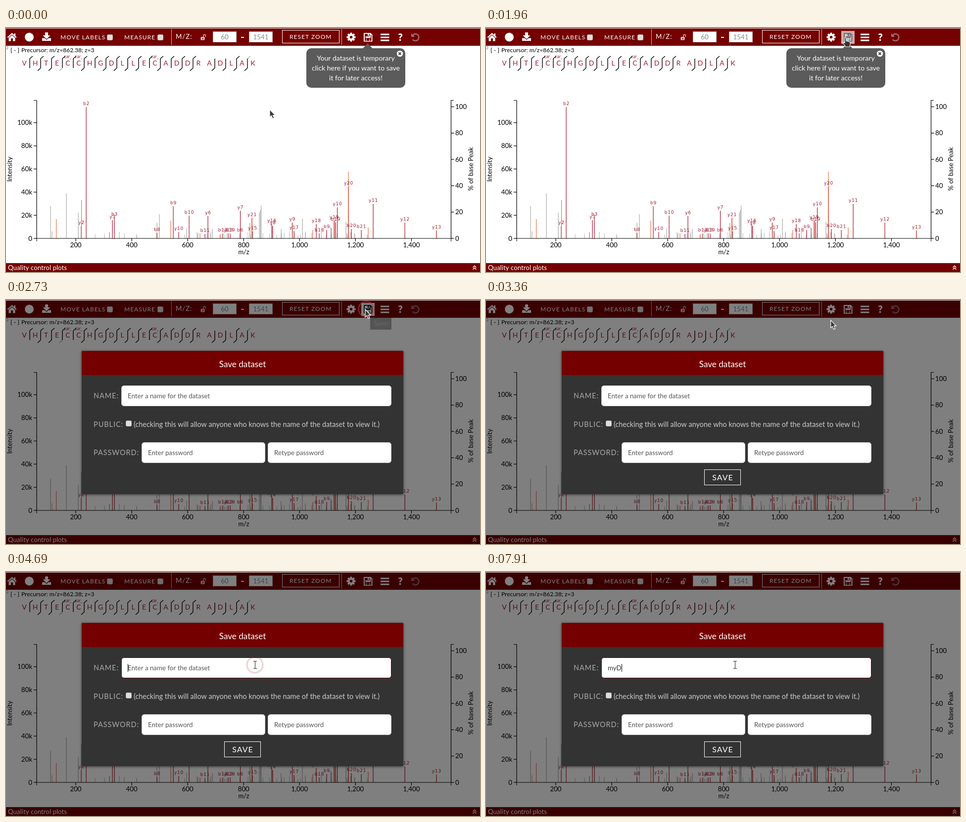
Recreate the animation shown at these times as an HTML page with a canvas. Size 958 by 494 pixels, loop 8 s.

```html
<!DOCTYPE html>
<html lang="en">
<head>
<meta charset="utf-8">
<title>Save dataset</title>
<style>
html, body { margin: 0; width: 100%; height: 100%; overflow: hidden; background: #fff; }
canvas { display: block; }
</style>
</head>
<body>
<canvas id="stage" width="958" height="494"></canvas>
<script>
const ctx = document.getElementById('stage').getContext('2d');
const LOOP = 8000, STEP = 70;
const MAROON = '#750000', RED = '#a8182d', ORANGE = '#e8714f', GREY = '#aaa';

// Labelled peaks: x, top, ion
const IONS = [
  [162, 160, 'b2'], [152, 401, 'y2'], [219, 384, 'b3'], [215, 389, 'y3'], [305, 415, 'b8'],
  [338, 361, 'b9'], [349, 413, 'y10'], [370, 380, 'b10'], [402, 417, 'b11'], [408, 381, 'y6'],
  [438, 416, 'b13'], [449, 416, 'y13'], [453, 416, 'b19'], [473, 416, 'b6'], [473.5, 370, 'y7'],
  [497, 385, 'y21'], [498, 412, 'y15'], [537, 397, 'y16'], [539, 401, 'y8'], [578.5, 394, 'y9'],
  [582, 411, 'y17'], [627, 397, 'y18'], [633, 416, 'b18'], [648, 409, 'b9'], [669.5, 363, 'y10'],
  [663, 390, 'y19'], [666, 394, 'b19'], [692, 321, 'y20'], [698, 407, 'b20'], [718, 409, 'b21'],
  [742, 356, 'y11'], [806, 394, 'y12'], [870, 410, 'y13']
];
const LOSSES = [[101.5, 387], [152.5, 348], [209, 413], [333, 390], [392, 416], [434, 418],
  [493, 395], [497, 383], [582, 411], [620, 409], [658, 405], [665, 390], [692, 291],
  [732, 404], [870, 410]];
const OTHERS = [[90, 361], [122, 335], [146, 374], [305, 394], [310, 377], [365, 406],
  [417, 407], [512, 373], [514, 368], [515.5, 360], [556, 407], [599, 386], [656, 402], [687, 392]];

const clamp = v => Math.max(0, Math.min(1, v));
const ramp = (t, a, b) => clamp((t - a) / (b - a));
const smooth = p => p * p * (3 - 2 * p);

function text(s, x, y, size, color, align = 'left', spacing = 0, family = 'Lato, sans-serif') {
  ctx.font = `${size}px ${family}`;
  ctx.letterSpacing = spacing + 'px';
  ctx.textAlign = align;
  ctx.fillStyle = color;
  ctx.fillText(s, x, y);
}
function rect(x, y, w, h, color) {
  ctx.fillStyle = color;
  ctx.fillRect(x, y, w, h);
}
function frame(x, y, w, h, color) {
  ctx.strokeStyle = color;
  ctx.lineWidth = 1;
  ctx.strokeRect(x + .5, y + .5, w - 1, h - 1);
}
function line(points, color, width = 1) {
  ctx.beginPath();
  for (let i = 0; i < points.length; i += 2) ctx.lineTo(points[i], points[i + 1]);
  ctx.strokeStyle = color;
  ctx.lineWidth = width;
  ctx.stroke();
}
function shape(d, color, x = 0, y = 0, outline) {
  const path = new Path2D(d);
  ctx.save();
  ctx.translate(x, y);
  ctx.fillStyle = color;
  ctx.fill(path);
  if (outline) {
    ctx.strokeStyle = outline;
    ctx.lineWidth = 1.2;
    ctx.stroke(path);
  }
  ctx.restore();
}
function circle(x, y, r, color, width) {
  ctx.beginPath();
  ctx.arc(x, y, r, 0, 2 * Math.PI);
  ctx.fillStyle = ctx.strokeStyle = color;
  ctx.lineWidth = width;
  width ? ctx.stroke() : ctx.fill();
}
function box(x, y, w, h, r, fill, border) {
  ctx.beginPath();
  ctx.roundRect(x, y, w, h, r);
  ctx.fillStyle = fill;
  ctx.fill();
  if (!border) return;
  ctx.strokeStyle = border;
  ctx.lineWidth = 1;
  ctx.stroke();
}
function faded(alpha, draw) {
  if (alpha <= 0) return;
  ctx.save();
  ctx.globalAlpha = alpha;
  draw();
  ctx.restore();
}
function checkbox(x, y) {
  box(x + .5, y + .5, 11, 11, 2, '#dedede', '#b5b5b5');
}
function upright(s, x, y) {
  ctx.save();
  ctx.translate(x, y);
  ctx.rotate(-Math.PI / 2);
  text(s, 0, 0, 13.3, '#000', 'center');
  ctx.restore();
}

function floppy(color, back) {
  shape('M723 10H737L740.500 13.500V27.500H723Z', color);
  rect(725, 12, 1.5, 14, back);
  rect(726, 12, 9, 5, back);
  rect(731, 12, 2.5, 4, color);
  rect(726, 20, 11, 6, back);
  rect(737, 14, 1.5, 12, back);
  rect(727.500, 21.500, 8, 4.500, color);
  rect(728.500, 21.500, 6, 4.500, back);
}

function toolbar(hover) {
  rect(0, 0, 958, 1, '#ddd');
  rect(0, 1, 958, 35, MAROON);
  shape('M12 10L2.500 18.500L4 20L12 13L20 20L21.500 18.500L19 16V11H16.500V13.800ZM12 14.500L5.500 20V26.500H10V21H14V26.500H18.500V20Z', '#fff');
  circle(47, 18.5, 9, '#fff');
  shape('M79 9H85V15H89.500L82 22.500L74.500 15H79ZM73 20.500H78L82 24L86 20.500H91V26H73Z', '#fff');
  text('MOVE LABELS', 110, 23, 12, '#fff', 'left', 1);
  checkbox(204, 13);
  text('MEASURE', 239, 23, 12, '#fff', 'left', 1);
  checkbox(306, 13);
  for (const x of [334, 678]) rect(x, 2, 1, 32, '#cba');
  text('M/Z:', 343, 22, 13.3, '#fff', 'left', 1);
  box(393.5, 18, 8, 6.500, 1, '#ddc4c4');
  rect(397, 20, 1.5, 3, MAROON);
  line([399, 18, 399, 15, 400, 13.500, 402.500, 13.500, 403.500, 15, 403.500, 18], '#ddc4c4', 1.3);
  for (const [x, s] of [[418, '60'], [491, '1541']]) {
    rect(x, 7, 48, 22, '#fff');
    frame(x, 7, 48, 22, '#bbb');
    text(s, x + 24, 23, 13.3, '#888', 'center');
  }
  rect(475, 18, 6, 2, '#fff');
  frame(558, 4, 116, 27, '#fff');
  text('RESET ZOOM', 573, 22, 12, '#fff', 'left', 1);
  for (let i = 0; i < 8; i++) {
    const c = Math.cos(i * Math.PI / 4), s = Math.sin(i * Math.PI / 4);
    line([697.5 + 5 * c, 18.5 + 5 * s, 697.5 + 9 * c, 18.5 + 9 * s], '#fff', 3.800);
  }
  circle(697.5, 18.5, 4.800, '#fff', 4);
  floppy('#fff', MAROON);
  faded(hover, () => {
    rect(718, 6, 27, 26, '#fff');
    floppy('#222', '#fff');
  });
  for (const y of [11.5, 17.5, 23.5]) rect(757, y, 17.500, 3, '#fff');
  text('?', 797, 26, 20, '#fff', 'center', 0, 'Lato, sans-serif');
  ctx.font = '900 20px Lato, sans-serif';
  ctx.fillText('?', 797, 26);
  ctx.beginPath();
  ctx.arc(827.5, 19, 7, -2.6, 2.5);
  ctx.strokeStyle = '#a66b6b';
  ctx.lineWidth = 2.5;
  ctx.stroke();
  shape('M819 10.500V18H826.500Z', '#a66b6b');
}

function peptide() {
  text('[ - ]', 9, 49, 12, '#000');
  text('Precursor: m/z=862.38; z=3', 31, 49, 12, '#000');
  frame(-2, 37, 6, 6, '#999');
  [...'VHTECCHGDLLECADDRADLAK'].forEach((c, i) =>
    text(c, 37 + 22 * i, 76, 14, RED, 'center'));
  for (const x of [125, 147, 301]) text('car_', x, 61, 8.500, RED, 'center');
  const bSites = [2, 3, 6, 8, 9, 10, 11, 13, 15, 16, 18, 19, 20, 21];
  for (let i = 1; i < 22; i++) {
    if (i == 17) continue;
    const x = 48 + 22 * i - 22;
    line([x, 62, x, 81], '#000', 1.4);
    if (i < 17 || i == 20) line([x, 62, x + 6, 57], '#000', 1.4);
    if (i == 21) line([x, 62, x + 6, 57], '#aaa', 1.4);
    if (bSites.includes(i)) line([x, 81, x - 6, 86.5], '#000', 1.4);
    if (i == 4) line([x, 81, x - 6, 86.5], '#aaa', 1.4);
  }
}

function spectrum() {
  const peak = (x, top, color) => rect(x - .5, top, 1.2, 426 - top, color);
  let seed = 7;
  const random = () => (seed = seed * 16807 % 2147483647) / 2147483647;
  for (let i = 0; i < 46; i++) {
    const x = Math.round(92 + 640 * Math.pow(random(), .7));
    peak(x, 420 - 9 * random(), i % 4 ? '#bbb' : '#e5a08a');
  }
  for (const [x, top] of OTHERS) peak(x, top, GREY);
  for (const [x, top, ion] of IONS) peak(x, top, RED);
  for (const [x, top] of LOSSES) peak(x, top, ORANGE);
  for (const [x, top, ion] of IONS)
    text(ion, x + .5, top - 4, 9, RED, 'center', .7, '"DejaVu Sans", sans-serif');

  line([56, 146.5, 62, 146.5, 62, 426, 899.5, 426, 899.5, 146.5, 905, 146.5], '#000', 1.2);
  line([62, 426, 62, 432], '#000');
  line([899.5, 426, 899.5, 432], '#000');
  for (let i = 0; i < 6; i++) {
    const left = 426 - 46.85 * i, right = 426 - 53.3 * i;
    line([56, left, 62, left], '#000', 1.2);
    text(i ? 20 * i + 'k' : '0', 53, left + 4.5, 13.3, '#000', 'right');
    line([899.5, right, 905.5, right], '#000', 1.2);
    text(20 * i, 908, right + 4.5, 13.3, '#000');
  }
  for (let mz = 200; mz <= 1400; mz += 200) {
    const x = 141 + (mz - 200) * .5654;
    line([x, 426, x, 432], '#000', 1.2);
    text(mz.toLocaleString('en-US'), x, 444, 13.3, '#000', 'center');
  }
  text('m/z', 480.5, 458, 13, '#000', 'center');
  upright('Intensity', 12, 286);
  upright('% of base Peak', 944, 285.5);
}

function footer() {
  rect(0, 476, 958, 18, MAROON);
  text('Quality control plots', 4, 490, 13.3, '#fff');
  for (const y of [485, 489]) line([943.5, y, 947, y - 3.5, 950.5, y], '#fff', 1.3);
}

function notice() {
  shape('M731 31L741.500 42H720.500Z', '#5b5b5b');
  box(607, 41, 200, 80, 10, '#5b5b5b');
  ['Your dataset is temporary', 'click here if you want to save', 'it for later access!']
    .forEach((s, i) => text(s, 707, 66 + 20 * i, 14, '#fff', 'center'));
  circle(796, 52, 6.2, '#fff');
  line([793.5, 49.5, 798.5, 54.5], '#444', 1.8);
  line([798.5, 49.5, 793.5, 54.5], '#444', 1.8);
}

function dialog(t) {
  rect(0, 1, 958, 493, 'rgba(0,0,0,.5)');
  ctx.save();
  ctx.shadowColor = 'rgba(0,0,0,.6)';
  ctx.shadowBlur = 5;
  ctx.shadowOffsetY = 1;
  rect(153, 103, 650, 290, '#333');
  ctx.restore();
  rect(153, 103, 650, 49, MAROON);
  text('Save dataset', 478, 136, 17.1, '#fff', 'center');
  text('NAME:', 177, 199, 14.4, '#aaa', 'left', 1);
  text('PUBLIC:', 177, 257, 14.4, '#aaa', 'left', 1);
  text('PASSWORD:', 177, 314, 14.4, '#aaa', 'left', 1);
  checkbox(242, 244);
  text('(checking this will allow anyone who knows the name of the dataset to view it.)', 258, 257, 14.4, '#ccc');

  const focused = t >= 4550;
  const field = (x, y, w, border) => box(x + .5, y + .5, w - 1, 41, 5, '#fff', border);
  field(233, 173, 546, focused ? MAROON : '#ccc');
  field(274, 288, 250, '#ccc');
  field(529, 288, 250, '#ccc');
  text('Enter password', 287, 314, 13.33, '#555');
  text('Retype password', 542, 314, 13.33, '#555');

  const typed = t < 6790 ? '' : t < 7070 ? 'm' : t < 7910 ? 'my' : 'myD';
  text(typed || 'Enter a name for the dataset', 246, 199, 13.33, typed ? '#333' : '#555');
  const blinkedOff = [[5110, 5740], [6300, 6790], [7700, 7910]].some(([a, b]) => t >= a && t < b);
  if (focused && !blinkedOff)
    rect(Math.round(246 + (typed ? ctx.measureText(typed).width : 0)), 186, 1, 16, '#000');

  if (t >= 2800) {
    frame(441, 343, 74, 32, '#fff');
    text('SAVE', 478.5, 365, 16, '#fff', 'center', 1);
  }
}

// Pointer stops: time, x, y
const STOPS = [[560, 533, 165], [1400, 706, 53], [1610, 722, 24], [1890, 726, 19],
  [3150, 726, 19], [4060, 509, 181], [4480, 503, 188]];

function pointer(t) {
  let [, x, y] = STOPS[0];
  for (let i = 1; i < STOPS.length; i++) {
    const [t0] = STOPS[i - 1], [t1, x1, y1] = STOPS[i];
    const p = smooth(ramp(t, t0, t1));
    x += (x1 - x) * p;
    y += (y1 - y) * p;
  }
  if (t >= 4060) {
    const beam = 'M-3.500 -7.500H-1L0 -6.500L1 -7.500H3.500M0 -6.500V6.500M-3.500 7.500H-1L0 6.500L1 7.500H3.500';
    ctx.save();
    ctx.translate(x + .5, y);
    ctx.strokeStyle = '#333';
    ctx.lineWidth = 1.1;
    ctx.stroke(new Path2D(beam));
    ctx.restore();
  } else if (t >= 1750 && t < 2730) {
    shape('M-1 1Q0 -1 2 1V7L9 9Q11 10 10 14L9 19H1L-4 12Q-5 9 -1 11Z', '#333', x, y, '#fff');
  } else {
    shape('M0 0V15.500L3.500 12.500L6 18.500L9 17.200L6.500 11.500H11Z', '#3a3a3a', x, y, '#fff');
  }
}

function draw(t) {
  const open = t >= 2730;
  rect(0, 0, 958, 494, '#fff');
  toolbar(ramp(t, 1680, 2100) * (1 - ramp(t, 2730, 3150)));
  peptide();
  spectrum();
  footer();
  if (!open) notice();
  faded(.45 * ramp(t, 2520, 2660) * (1 - ramp(t, 2800, 3080)), () => {
    rect(736, 36, 43, 24, '#444');
    text('Save', 757.5, 52, 14, '#fff', 'center');
  });
  if (open) dialog(t);

  const ringColor = 'rgb(145,15,40)';
  faded(.5 * ramp(t, 2310, 2590) * (1 - ramp(t, 2730, 3010)),
    () => circle(728, 18.5, 15.5, '#c8304a', 3));
  faded(.5 * ramp(t, 4550, 4970) * (1 - ramp(t, 5950, 6300)),
    () => circle(503, 188, 16, ringColor, 3.5));
  pointer(t);
}

function tick() {
  const t = performance.now() % LOOP;
  draw(Math.floor(t / STEP) * STEP);
  requestAnimationFrame(tick);
}
tick();
</script>
</body>
</html>
```
